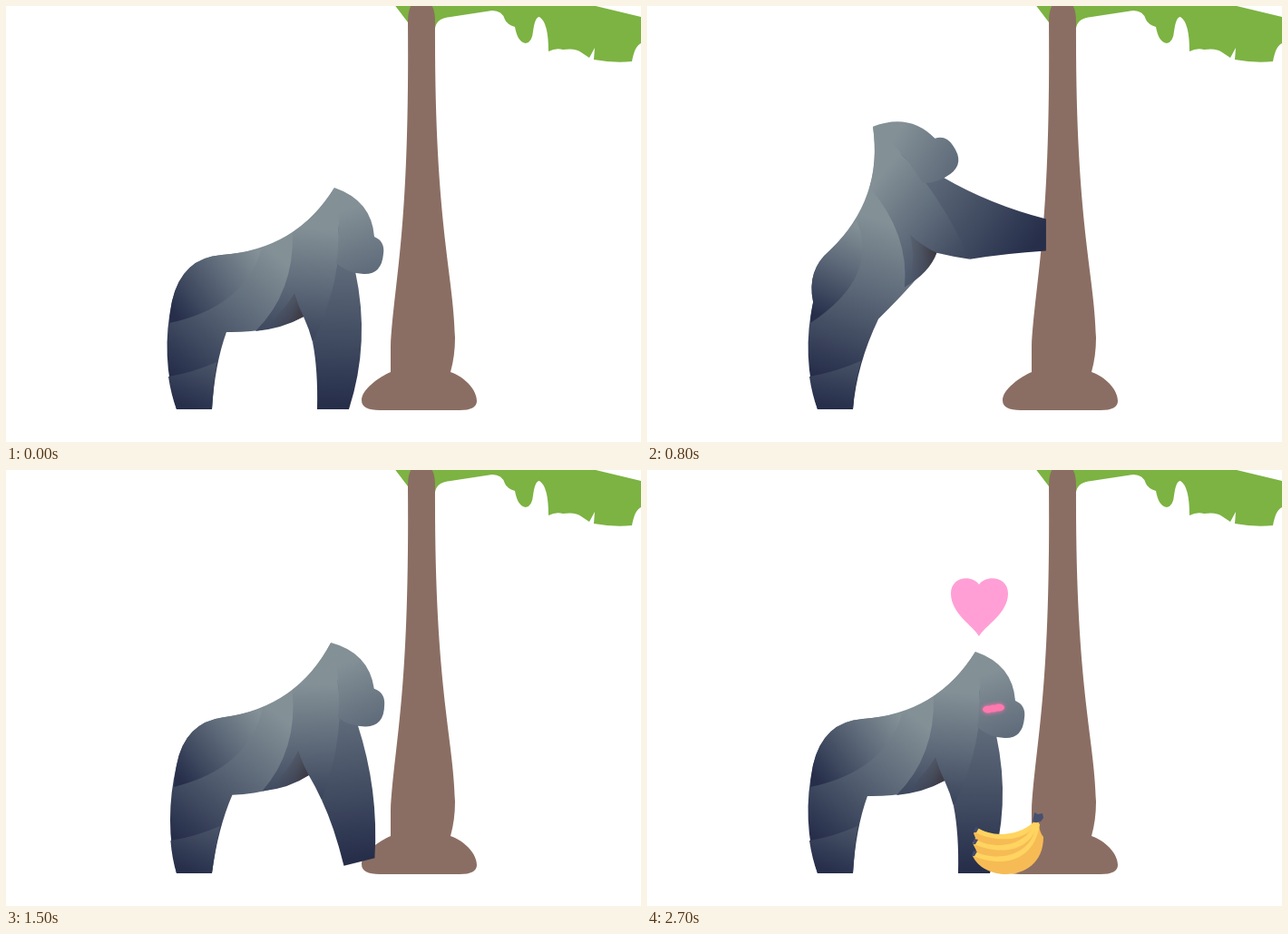
Write an HTML page with a canvas that moves like this. It is 700 px wide and 480 px high and loops after 3300 ms.

```html
<!DOCTYPE html>
<html lang="en">
<head>
<meta charset="utf-8">
<title>Gorilla and banana tree</title>
<style>
html, body { margin: 0; height: 100%; overflow: hidden; background: #fff; }
canvas { display: block; }
</style>
</head>
<body>
<canvas id="stage" width="700" height="480"></canvas>
<script>
const ctx = document.getElementById('stage').getContext('2d');
const LOOP = 3300, STEP = 100, SWAY = 0.033;

const FUR = ['#262e4a', '#566273', '#839096'];
const SHADE = ['rgba(56,48,54,.9)', 'rgba(56,48,54,.3)', 'rgba(56,48,54,0)'];
const HIP = [213, 321.5], NECK = [364, 283], ELBOW = [364, 353];

// The standing gorilla: gradient axis (dark to light), then an outline of quadratic curves.
const parts = [
  part(FUR, '185 405 295 272', '188 444  170 385 183 325  194 277 238 274  320 268 362 200  380 290 328 342  292 360 243 359  230 395 227 444'),
  part(FUR, '330 400 345 245', '362 200  342 232 316 249  318 315 275 358  305 355 328 342  334 355 338 370  400 290 362 200'),
  part(SHADE, '331 343 298 332', '318 316  322 330 328 342  305 355 276 358  302 343 318 316'),
  part(FUR, '362 440 366 180', '378 444  402 370 385 292  374 285 366 240  372 300 338 370  344 400 343 444'),
  part(FUR, '186 340 278 272', '180 349  181 335 183 325  194 277 238 274  262 272 282 267  262 332 180 349'),
  part(FUR, '195 440 250 300', '227 444  229 415 232 392  208 403 179 408  182 428 188 444'),
  part(FUR.slice(1), '402 312 372 225', '362 200  403 214 406 254  418 259 416 273  414 296 394 295  376 294 364 283  371 240 362 200')
];

// Joint angles in degrees; shift moves the hips sideways.
const stand = { lean: 0, nod: 0, bend: 0, shift: 0 };
const stepUp = { lean: -4, nod: 0, bend: -10, shift: 5 };
const reach = { lean: -42, nod: -8, bend: -46, shift: 0 };
const push = { lean: -40, nod: 0, bend: -50, shift: 0 };
const timeline = [[0, stand], [1, stepUp], [4, reach], [5, push], [12, push], [13, reach], [15, stepUp], [16, stand], [33, stand]];

function part(colors, axis, outline) {
  return { colors, axis: points(axis), outline: points(outline) };
}

function points(text) {
  return text.match(/\d+ \d+/g).map(pair => pair.split(' ').map(Number));
}

function clamp(v) {
  return Math.max(0, Math.min(1, v));
}

function ramp(v, from, to) {
  return clamp((v - from) / (to - from));
}

function turn([x, y], [cx, cy], degrees) {
  const a = degrees * Math.PI / 180, c = Math.cos(a), s = Math.sin(a);
  return [cx + (x - cx) * c - (y - cy) * s, cy + (x - cx) * s + (y - cy) * c];
}

function poseAt(step) {
  const i = timeline.findIndex(([end]) => end > step);
  const [t0, a] = timeline[i - 1], [t1, b] = timeline[i];
  const pose = {};
  for (const joint in a) pose[joint] = a[joint] + (b[joint] - a[joint]) * (step - t0) / (t1 - t0);
  return pose;
}

// Each joint turns the points near it, with a soft border.
function deform([x, y], pose) {
  const arm = ramp(x, 290, 330) * ramp(y, 310, 410);
  const head = ramp(x, 345, 365) * ramp(y, 305, 285);
  const torso = clamp((x - 183) / 70 + (330 - y) / 100);
  let p = turn([x, y], ELBOW, pose.bend * arm);
  p = turn(p, NECK, pose.nod * head);
  p = turn(p, HIP, pose.lean * torso);
  return [p[0] + pose.shift * Math.max(torso, ramp(y, 443, 370)), p[1]];
}

function drawGorilla(pose) {
  const place = p => deform(p, pose);
  for (const { colors, axis, outline } of parts) {
    const [dark, light] = axis.map(place), p = outline.map(place);
    const gradient = ctx.createLinearGradient(...dark, ...light);
    colors.forEach((c, i) => gradient.addColorStop(i / (colors.length - 1), c));
    ctx.beginPath();
    ctx.moveTo(...p[0]);
    for (let i = 1; i < p.length; i += 2) ctx.quadraticCurveTo(...p[i], ...p[i + 1]);
    ctx.fillStyle = gradient;
    ctx.fill();
  }
}

function fill(color, path) {
  ctx.fillStyle = color;
  ctx.fill(new Path2D(path));
}

function group(draw) {
  ctx.save();
  draw();
  ctx.restore();
}

function rotateAt(x, y, angle) {
  ctx.translate(x, y);
  ctx.rotate(angle);
  ctx.translate(-x, -y);
}

function drawTree() {
  fill('#7cb342', 'M411-24L443 18L458 24H473Q475 13 490 12L536 5Q547 5 550 15Q552 20 561 23Q564 40 573 41Q580 40 581 28Q583 12 588 12Q598 18 598 50Q606 46 614 48Q628 46 634 51L643 57L649 46L648 59Q670 63 690 61Q693 44 700 41L730 30V19L650 0L600-24Z');
  fill('#8b6e63', 'M443 17Q443 4 448-3H468Q473 4 473 17C472 240 493 290 495 365Q495 385 490 403C505 408 519 422 519 435Q519 445 500 445H412Q392 445 392 434C392 422 412 408 424 403V375C428 300 445 250 443 17Z');
}

function drawBananas() {
  fill('#f6bb55', 'M364 394Q402 415 426 388H432Q432 398 437 404C437 455 372 454 359 425L363 419L359 411L362 405L360 400Z');
  for (let i = 0; i < 3; i++) {
    const y = 394 + 13 * i, x = 364 - i, stem = 426 + 2 * i;
    fill('#ffd460', `M${x} ${y}C380 ${y + 10} ${408 + 8 * i} ${y + 10} ${stem} 388L${stem + 3} 390C${416 + 5 * i} ${y + 16} 385 ${y + 16} ${x - 2} ${y + 5}Z`);
    fill('#414b6a', `M${x - 4} ${y + 5}l2-6 4 1-3 5Z`);
  }
  fill('#46506f', 'M425 387L427 377L431 379L436 378L437 383L434 387L429 388Z');
}

function drawLove(k) {
  group(() => {
    ctx.globalAlpha = k;
    ctx.shadowColor = '#ff70b0';
    ctx.shadowBlur = 5;
    ctx.fillStyle = '#ff78ae';
    ctx.beginPath();
    for (let i = -1; i <= 1; i++) ctx.ellipse(382 + 6 * i, 262.5 - i % 2, 6, 4, 0, 0, 7);
    ctx.fill();
  });
  group(() => {
    ctx.translate(366, 152);
    ctx.scale(k, k);
    fill('#ff9fd6', 'M0 31C-6 20-31 6-31-16C-31-35-8-37 0-26C8-37 32-35 32-16C32 6 6 20 0 31Z');
  });
}

function draw(now) {
  const step = Math.floor(now % LOOP / STEP);
  const shaking = step >= 5 && step < 12 && step % 2 === 1;
  ctx.clearRect(0, 0, 700, 480);
  group(() => {
    if (shaking) rotateAt(455, 444, SWAY);
    drawTree();
  });
  group(() => {
    if (shaking) ctx.transform(1, 0, -SWAY, 1, SWAY * 443, 0);
    drawGorilla(poseAt(step));
  });
  if (step >= 18) group(() => {
    ctx.translate(0, 102 * Math.min(step - 22, 0));
    if (step === 23) rotateAt(395, 442, 0.1);
    drawBananas();
  });
  if (step >= 24) drawLove(Math.min((step - 23) / 4, 1));
  requestAnimationFrame(draw);
}
requestAnimationFrame(draw);
</script>
</body>
</html>
```
